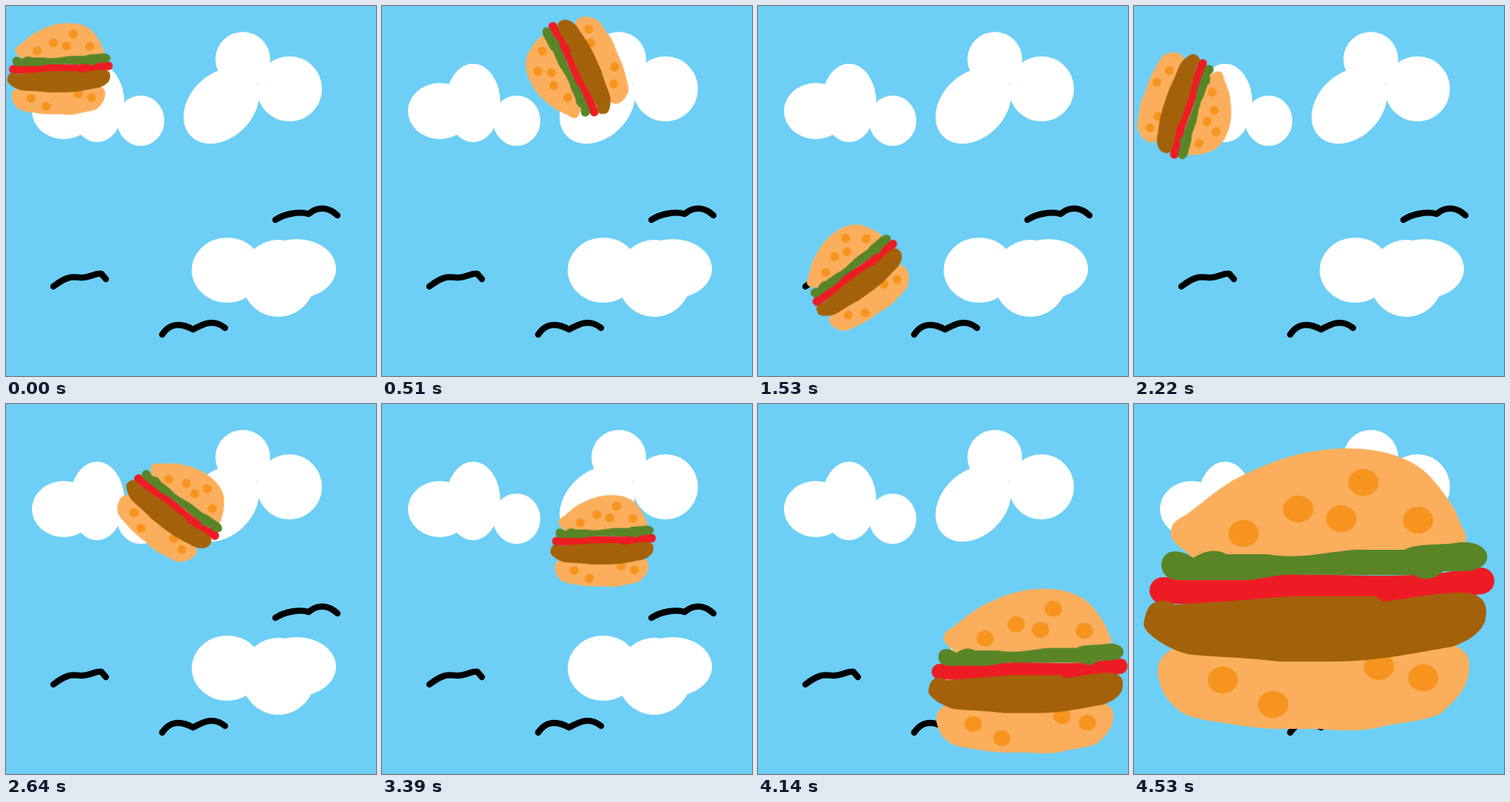
These frames come from a looping animation (500x500 px, 4.56 s). An HTML page:

```html
<!DOCTYPE html>
<html lang="en">
<head>
<meta charset="utf-8">
<title>Flying burger</title>
<style>
  html, body { margin: 0; width: 100%; height: 100%; overflow: hidden; background: #6dcff6; }
  svg { display: block; width: 100%; height: 100%; }

  .clouds { fill: #fff; }
  .birds { fill: none; stroke: #000; stroke-width: 8.4; stroke-linecap: round; stroke-linejoin: round; }
  .bun { fill: #fbaf5d; }
  .seeds { fill: #f7941d; }
  .seeds ellipse { rx: 20.5px; ry: 18.2px; }
  .tomato { fill: none; stroke: #ed1c24; stroke-width: 36; stroke-linecap: round; }
  .lettuce { fill: #598527; }
  .patty { fill: #a36209; }

  .burger {
    transform-origin: 0 0;
    transform: translate(72.5px, 84.8px) scale(.301, .325);
    animation: fly 4560ms linear infinite;
  }
  /* Zigzag with a half turn there and back, a rest, then dive and zoom in. */
  @keyframes fly {
    0%       { transform: translate(72.5px, 84.8px) rotate(0deg) scale(.301, .325); }
    16.447%  { transform: translate(348.7px, 86.3px) rotate(-167.2deg) scale(.301, .325); }
    38.158%  { transform: translate(72.4px, 436.3px) rotate(0deg) scale(.301, .325); }
    51.316%  { transform: translate(72.6px, 63.5px) rotate(136.2deg) scale(.301, .325); }
    60.526%, 73.684% { transform: translate(290.4px, 170px) rotate(0deg) scale(.301, .325); }
    85.526%  { transform: translate(435.9px, 429px) rotate(0deg) scale(.301, .325); }
    99.342%, 100% { transform: translate(250px, 250px) rotate(0deg) scale(1, 1); }
  }
</style>
</head>
<body>
<svg viewBox="0 0 500 500">
  <g class="clouds">
    <ellipse cx="78" cy="142" rx="43" ry="38"/>
    <ellipse cx="123" cy="131" rx="37" ry="53"/>
    <ellipse cx="182" cy="155" rx="32" ry="34"/>

    <ellipse cx="291" cy="135" rx="58" ry="43" transform="rotate(-45 291 135)"/>
    <circle cx="320" cy="72" r="37"/>
    <circle cx="383" cy="112" r="44"/>

    <ellipse cx="299" cy="357" rx="48" ry="44"/>
    <ellipse cx="368" cy="368" rx="50" ry="52"/>
    <ellipse cx="393" cy="355" rx="53" ry="40"/>
  </g>

  <g class="birds">
    <path d="M64,379C86,362 92,367 102,367S124,360 129,362L135,369"/>
    <path d="M364,289C376,281 396,277 409,281C422,270 436,272 448,283"/>
    <path d="M211,444C222,428 236,428 253,437C266,430 280,422 296,435"/>
  </g>

  <g class="burger">
    <g transform="translate(-250 -250)">
      <path class="bun" d="M55,330C30,340 30,362 34,374C38,390 45,400 55,409C68,424 95,427 115,430S160,438 190,439H250C290,443 315,441 335,436S400,428 416,417C435,400 453,382 453,355C454,338 445,331 430,325Z"/>
      <g class="seeds">
        <ellipse cx="120" cy="373"/>
        <ellipse cx="188" cy="406"/>
        <ellipse cx="331" cy="355"/>
        <ellipse cx="391" cy="370"/>
      </g>
      <path class="bun" d="M50,178C48,158 62,156 74,147C100,128 120,108 152,94C190,76 230,61 285,60S380,76 400,98S437,145 441,162Q452,178 447,188L440,215H88C72,200 52,188 50,178Z"/>
      <g class="seeds">
        <ellipse cx="148" cy="175"/>
        <ellipse cx="222" cy="142"/>
        <ellipse cx="280" cy="155"/>
        <ellipse cx="384" cy="157"/>
        <ellipse cx="310" cy="106"/>
      </g>
      <path class="tomato" d="M39,252H150C200,245 260,250 340,250S440,241 469,239"/>
      <path class="lettuce" d="M56,199Q70,200 80,208Q105,192 125,203H180C230,212 280,195 310,197H365C385,187 410,192 440,187C488,184 490,226 445,226H418Q398,244 378,231C310,232 250,230 200,231Q170,236 155,238H60C30,238 30,199 56,199Z"/>
      <path class="patty" d="M36,266Q45,265 55,271C110,268 160,264 208,260H326L338,267C380,262 400,256 440,255C480,254 478,280 474,294C468,312 445,323 430,328C380,336 330,348 270,348H195C150,342 90,341 72,338C45,331 13,310 13,297C16,282 18,268 36,266Z"/>
    </g>
  </g>
</svg>
</body>
</html>
```
